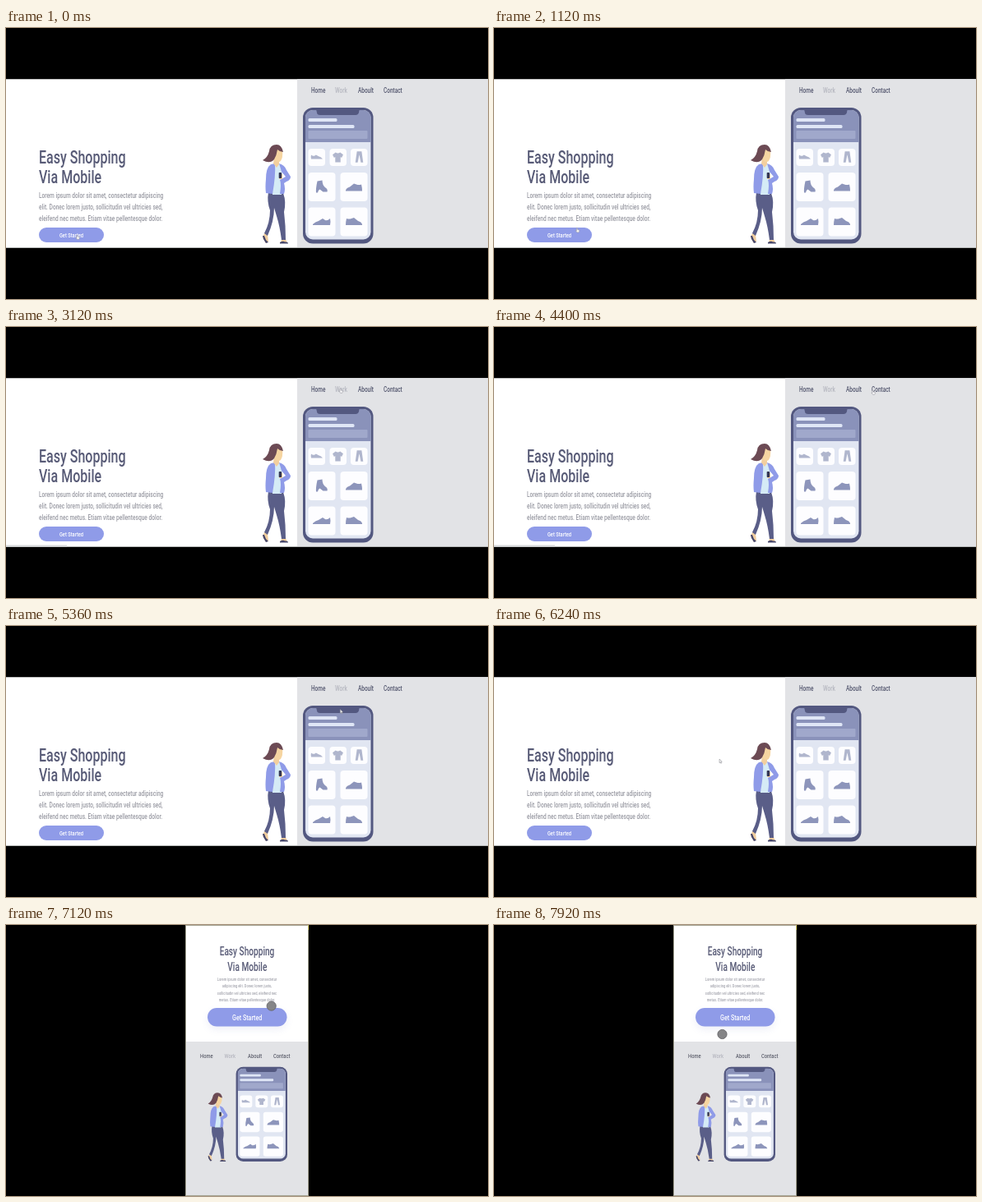
Animation of 586x330 px, one loop 8 s. Source, as an HTML page with a canvas:

```html
<!DOCTYPE html>
<html lang="en">
<head>
<meta charset="utf-8">
<title>Easy Shopping</title>
<style>
html, body { margin: 0; width: 100%; height: 100%; overflow: hidden; background: #000; }
canvas { display: block; width: 586px; height: 330px; }
</style>
</head>
<body>
<canvas id="stage" width="586" height="330"></canvas>
<script>
const ctx = document.getElementById('stage').getContext('2d');
const LOOP = 8000, SWITCH = 6320, NARROW = 0.728;
const INK = '#575a76', FRAME = '#535880', SHOE = '#8d95bb', LILAC = '#8f9be8';
const ease = k => k * k * (3 - 2 * k);

function rect(x, y, w, h, color, r = 0) {
  ctx.fillStyle = color;
  ctx.beginPath();
  ctx.roundRect(x, y, w, h, r);
  ctx.fill();
}

function shape(d, color, line) {
  const p = new Path2D(d);
  ctx.fillStyle = color;
  ctx.fill(p);
  if (line) {
    ctx.strokeStyle = line;
    ctx.lineWidth = 0.5;
    ctx.stroke(p);
  }
}

// Every label shares one condensed look.
function text(s, x, y, size, color, align = 'left') {
  ctx.save();
  ctx.translate(x, y);
  ctx.scale(NARROW, 1);
  ctx.font = `500 ${size}px Roboto, "Open Sans", sans-serif`;
  ctx.textAlign = align;
  ctx.fillStyle = color;
  ctx.fillText(s, 0, 0);
  ctx.restore();
}

function placed(x, y, sx, sy, draw) {
  ctx.save();
  ctx.translate(x, y);
  ctx.scale(sx, sy);
  draw();
  ctx.restore();
}

const SNEAKER = 'M-10 3 Q-9 0 -5 -1 L0 -5 L3 -4 Q6 -3 9 -4 Q10 0 10 4 H-10 Z';
const FLAT = 'M-11 3 Q-8 0 -4 -1 L1 -4 L4 -2 Q7 -1 10 -4 Q11 0 10 4 H-11 Z';
const BOOT = 'M-5 -7 L1 -8 Q1 -2 5 1 Q8 3 7 6 H2 L-2 3 Q-4 4 -4.5 7 H-6.5 Q-7 2 -5 -7 Z';
const TEE = 'M-3 -6 Q0 -4 3 -6 L7 -3 L5 1 L3.5 0 V7 H-3.5 V0 L-5 1 L-7 -3 Z';
const TROUSERS = 'M-3 -7 H3 L5 7 H2 L0 -3 L-2 7 H-5 Z';

// Origin: top left corner of the phone; size 86 by 166.
function phone() {
  rect(0, 0, 85.5, 165.5, FRAME, 12);
  ctx.save();
  ctx.beginPath();
  ctx.roundRect(3, 3, 79.5, 157.5, 9);
  ctx.clip();
  rect(3, 3, 80, 158, '#e1e6f2');
  rect(3, 3, 80, 39, '#8a92ba');
  ctx.restore();
  shape('M16 2 H69 Q68 4 68 6 Q67 9 64 9 H21 Q17 9 17 6 Z', FRAME);
  rect(6.5, 13, 35, 4, '#dfe6f6', 1.5);
  rect(6.5, 21, 56, 4, '#dfe6f6', 1.5);
  rect(6.5, 28, 72, 10, '#a0a8cb', 1);
  [6.5, 32.5, 58].forEach(x => rect(x, 50, 20.5, 21, '#fdfdff', 4));
  for (const y of [79, 121.5])
    for (const x of [6.5, 45.5]) rect(x, y, 33, 35, '#fdfdff', 4);
  const icons = [
    [16.5, 60, 0.65, FLAT, -1], [42.5, 60, 0.92, TEE, 1], [68.5, 60, 0.95, TROUSERS, 1],
    [22.5, 96.5, 1, BOOT, 1], [62, 97.5, 1, SNEAKER, 1],
    [23, 139, 1, FLAT, 1], [62, 139, 1, SNEAKER, -1]
  ];
  icons.forEach(([x, y, k, d, flip], i) =>
    placed(x, y, k * flip, k, () => shape(d, i < 3 ? '#b0b6cd' : SHOE)));
}

// Origin: top left of the figure; size 34 by 121.
function woman() {
  shape('M2 108 L6 110 L7 118 L4 120 L0 113 Z M23 115 L28 115 L30 120 H22 Z', '#f0cd9e');
  shape('M0 111 L2 111 L4 116 L7 119 L4 120 L1 115 Z M21 119 Q25 117 27 118.5 Q31 118 31 120.5 H21 Z', '#45466a');
  shape('M7 58 L25 59 Q29 70 26 82 Q28 98 28 116 H23 Q21 100 17 87 L14 77 Q14 93 6 111 L2 108 Q9 95 9 80 Q5 69 7 58 Z', '#5a5e88');
  shape('M13 23 H20 L24 33 L23 61 H12 Z', '#d5ebf6');
  shape('M10 24 L15 23 Q16 38 12 60 L4 59 Q3 52 4 42 Q4 28 10 24 Z', LILAC);
  shape('M20 23 Q27 25 29 31 L34 39 Q34 43 29 45 L26 47 Q28 54 26 60 H21 Q23 48 21 43 L28 39 L23 33 Z', LILAC);
  shape('M14 16 L20 18 L20 24 L17 28 L13 23 Z M20 36 L24 36 L24 42 L20 42 Z', '#f2cf9f');
  rect(19.7, 34, 3.4, 7, '#323554', 0.8);
  shape('M14 7 Q20 3 24 8 Q25 15 22 20 Q18 23 14 18 Z', '#f6d5a1');
  shape('M8 8 Q9 0 17 0 Q23 0 25 9 Q21 9 18 6 Q17 13 14 18 Q9 24 0 19 Q6 16 8 8 Z', '#6c4a54');
}

const links = [['Home', 371, 17], ['Work', 400, 15], ['Aboult', 428, 19], ['Contact', 459, 23]];
const path = [
  [0, 86, 252], [1000, 86, 252], [1840, 342, 101], [2160, 376, 83], [2400, 379, 75],
  [2800, 379, 75], [3120, 406, 75], [3600, 408, 76], [3680, 408, 76], [4080, 437, 75],
  [4240, 440, 75], [4400, 460, 77], [4640, 470, 75], [5040, 470, 75], [5840, 290, 150],
  [6240, 274, 162], [6320, 274, 162]
];
const touch = [[6760, 373, 62], [7200, 318, 102], [7520, 296, 113], [7720, 296, 113], [7920, 277.5, 133], [8000, 277.5, 133]];

function along(points, t) {
  const i = Math.max(1, points.findIndex(p => p[0] > t));
  const [a, b] = [points[i - 1], points[i]];
  const k = ease(Math.min(1, Math.max(0, (t - a[0]) / (b[0] - a[0]))));
  return [a[1] + (b[1] - a[1]) * k, a[2] + (b[2] - a[2]) * k];
}

function pointer(x, y, hand) {
  placed(x, y, 1, 1, () => hand
    ? shape('M0 0 Q0.8 -0.4 1.2 0.5 V2 L3.5 2.6 L3.3 4.2 L2.6 5.4 H0.6 L-1.2 3 L0 3.3 Z', '#f4f4f5', '#8a8b94')
    : shape('M0 0 L3.3 3.2 L1.9 3.4 L2.6 5 L1.8 5.3 L1.1 3.8 L0 4.7 Z', '#f4f4f4', '#85868c'));
}

function wide(t) {
  rect(0, 62.3, 586, 204.7, '#fff');
  rect(354, 62.3, 232, 204.7, '#e2e3e6');
  rect(0, 267, 586, 1, '#b7b9b8');
  text('Easy Shopping', 40, 165, 22, INK);
  text('Via Mobile', 40, 188.5, 22, INK);
  ['Lorem ipsum dolor sit amet, consectetur adipiscing',
   'elit. Donec lorem justo, sollicitudin vel ultricies sed,',
   'eleifend nec metus. Etiam vitae pellentesque dolor.'
  ].forEach((s, i) => text(s, 40, 207 + i * 14, 9.05, '#999aa3'));
  rect(40, 243, 79, 18, LILAC, 9);
  text('Get Started', 79.5, 255, 7.9, '#fff', 'center');
  for (const [s, x] of links) text(s, x, 79, 8.9, s === 'Work' ? '#b5b6bf' : '#53566e');
  placed(312, 142, 1, 1, woman);
  placed(361, 97, 1, 1, phone);

  const [x, y] = along(path, t);
  const onLink = y < 80 && links.some(([, left, w]) => x >= left && x <= left + w);
  const onButton = x >= 40 && x <= 119 && y >= 243;
  if (onLink) rect(0, 265.5, 74, 2, '#d9dbde');
  pointer(x, y, onLink || onButton);
}

function narrow(t) {
  ctx.save();
  ctx.beginPath();
  ctx.rect(218, 0, 150, 330);
  ctx.clip();
  rect(218, 0, 150, 142, '#fff');
  rect(218, 142, 150, 188, '#e2e3e6');
  ctx.strokeStyle = '#a5a493';
  ctx.lineWidth = 1;
  ctx.strokeRect(218.5, 0.5, 149, 329);
  rect(367, 0, 1, 6, '#e8dc72');
  text('Easy Shopping', 293, 37.3, 13.9, INK, 'center');
  text('Via Mobile', 293.3, 55.8, 13.9, INK, 'center');
  ['Lorem ipsum dolor sit amet, consectetur',
   'adipiscing elit. Donec lorem justo,',
   'sollicitudin vel ultricies sed, eleifend nec',
   'metus. Etiam vitae pellentesque dolor.'
  ].forEach((s, i) => text(s, 293, 68 + i * 8.4, 5.5, '#a3a4ad', 'center'));
  ctx.shadowColor = 'rgba(120,130,200,.12)';
  ctx.shadowBlur = 9;
  ctx.shadowOffsetY = 4;
  rect(245, 101, 96.5, 22.5, LILAC, 11.2);
  ctx.shadowColor = 'transparent';
  text('Get Started', 293.2, 115.6, 9.8, '#fff', 'center');
  [236, 265.5, 294, 325].forEach((x, i) =>
    text(links[i][0], x, 162, 8, i === 1 ? '#b5b6bf' : '#5f616e'));
  placed(245.6, 204.2, 0.7, 0.695, woman);
  placed(279.6, 172.7, 0.73, 0.697, phone);

  if (t >= touch[0][0]) {
    const [x, y] = along(touch, t);
    ctx.beginPath();
    ctx.arc(x, y, 5.6, 0, 7);
    ctx.fillStyle = '#858587';
    ctx.fill();
    ctx.strokeStyle = '#67676a';
    ctx.lineWidth = 0.9;
    ctx.stroke();
  }
  ctx.restore();
}

function frame(now) {
  const t = now % LOOP;
  rect(0, 0, 586, 330, '#000');
  (t < SWITCH ? wide : narrow)(t);
  requestAnimationFrame(frame);
}
requestAnimationFrame(frame);
</script>
</body>
</html>
```
